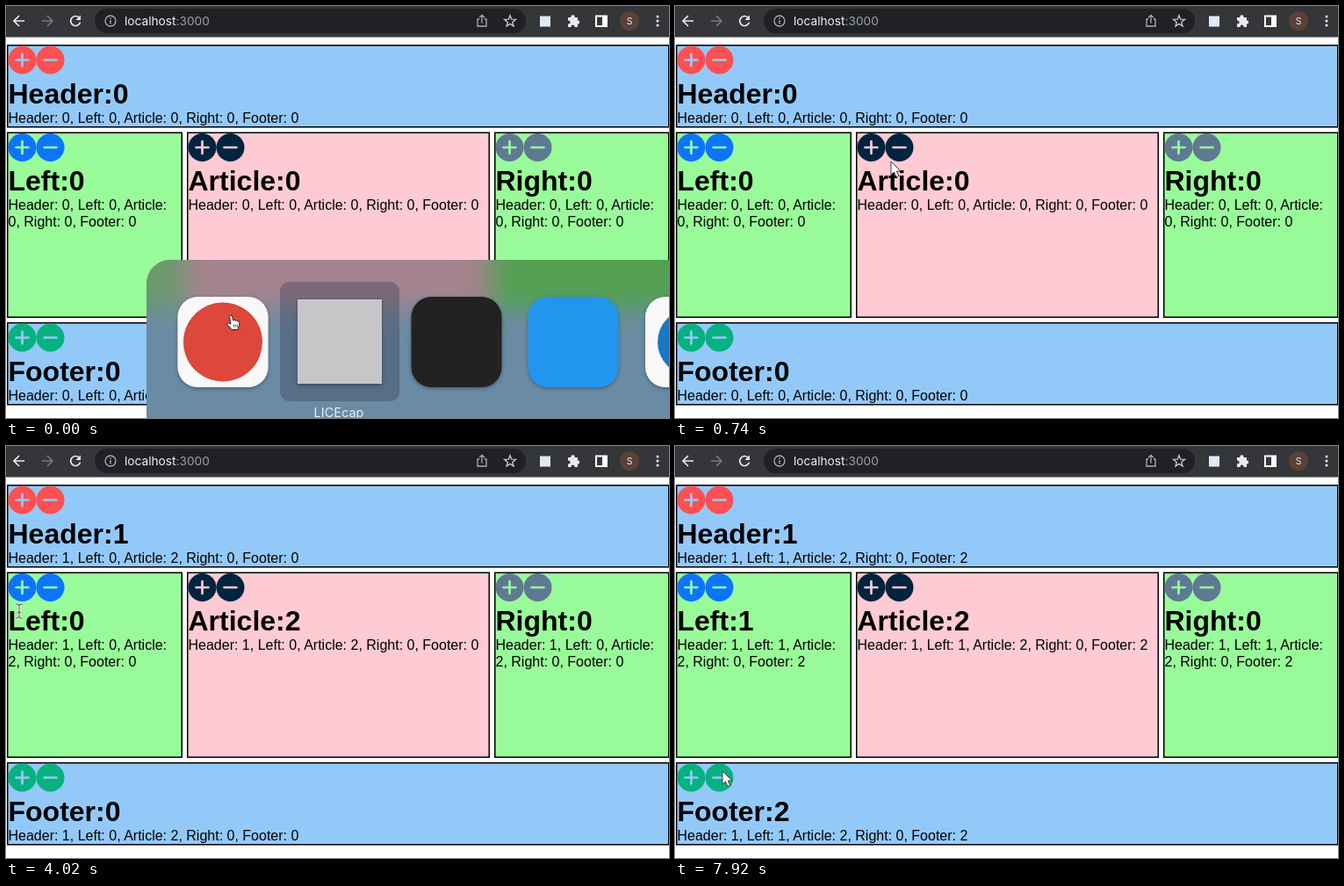
An HTML page that plays this animation: 755 px wide and 469 px high, repeating every 8 s.

```html
<!DOCTYPE html>
<html lang="en">
<head>
<meta charset="utf-8">
<title>Counter layout</title>
<style>
html, body { margin: 0; width: 100%; height: 100%; overflow: hidden; background: #fff; }
svg { display: block; position: absolute; left: 0; top: 0; }
.h1 { font: bold 32px "Liberation Sans", Arial, sans-serif; }
.p { font: 16px "Liberation Sans", Arial, sans-serif; }
.ui { font: 13.7px Inter, sans-serif; }
.label { font: 14.5px Inter, sans-serif; fill: #eceef2; text-anchor: middle; }
</style>
</head>
<body>
<svg id="stage" width="755" height="469" viewBox="0 0 755 469"></svg>
<script>
const LOOP = 8000;
const BLUE = '#93c9f8', GREEN = '#99fa99', PINK = '#fecad3';

const panels = [
  { name: 'Header',  x: 1,   y: 44,  w: 754.5, h: 94.5, bg: BLUE,  btn: '#fc5053' },
  { name: 'Left',    x: 1,   y: 143.5, w: 200, h: 211.5, bg: GREEN, btn: '#0d75fb', wrap: true },
  { name: 'Article', x: 206, y: 143.5, w: 345, h: 211.5, bg: PINK,  btn: '#03233f' },
  { name: 'Right',   x: 556, y: 143.5, w: 199.5, h: 211.5, bg: GREEN, btn: '#5d7a92', wrap: true },
  { name: 'Footer',  x: 1,   y: 360, w: 754.5, h: 94.5, bg: BLUE,  btn: '#07b180' }
];

// time, counter, new value
const clicks = [
  [1340, 'Article', 1], [1640, 'Article', 2], [3430, 'Header', 1],
  [4620, 'Left', 1], [4920, 'Left', 2], [5670, 'Left', 1],
  [7170, 'Footer', 1], [7470, 'Footer', 2]
];

// time, pointer shape, x, y
const moves = [
  [0, 'hand', 256, 352], [150, 'hand', 260, 360], [290, 'hand', 266, 371],
  [440, 'hand', 271, 379], [590, 'arrow', 262, 285], [740, 'arrow', 246, 177],
  [890, 'arrow', 230, 166], [1040, 'arrow', 222, 159], [1930, 'arrow', 223, 158],
  [2230, 'arrow', 222, 157], [2380, 'arrow', 210, 150], [2530, 'arrow', 160, 122],
  [2680, 'beam', 114, 102], [2830, 'beam', 46, 92], [3130, 'arrow', 20, 64],
  [3280, 'arrow', 18, 61], [3730, 'arrow', 18, 78], [3870, 'arrow', 15, 150],
  [4020, 'beam', 15, 188], [4170, 'arrow', 18, 172], [4470, 'arrow', 20, 161],
  [5070, 'arrow', 34, 161], [5220, 'arrow', 49, 161], [5820, 'arrow', 42, 164],
  [5970, 'arrow', 24, 176], [6120, 'beam', 18, 201], [6270, 'arrow', 19, 305],
  [6420, 'arrow', 20, 396], [6570, 'arrow', 17, 378], [6720, 'arrow', 19, 370],
  [7020, 'arrow', 20, 370], [7770, 'arrow', 38, 370], [7920, 'arrow', 54, 370]
];

const SELECT = 150, DISMISS = 590;

const rect = (x, y, w, h, fill, more = '') =>
  `<rect x="${x}" y="${y}" width="${w}" height="${h}" fill="${fill}" ${more}/>`;
const disc = (x, y, r, fill) => `<circle cx="${x}" cy="${y}" r="${r}" fill="${fill}"/>`;
const line = (d, color, w = 1.7) =>
  `<path d="${d}" fill="none" stroke="${color}" stroke-width="${w}"/>`;
const text = (cls, x, y, s, more = '') =>
  `<text class="${cls}" x="${x}" y="${y}" ${more}>${s}</text>`;

function toolbar() {
  const on = '#e8eaed', dim = '#77787b', soft = '#a9adb2';
  const arrow = (x, dir, c) =>
    line(`M${x - 6 * dir} 17H${x + 6 * dir}M${x} 11L${x - 6 * dir} 17L${x} 23`, c);
  return rect(0, 0, 755, 35.5, '#35363a') +
    rect(101, 3, 491, 28, '#202124', 'rx="14"') +
    arrow(15, 1, on) + arrow(47, -1, dim) +
    line('M83.2 13.2A5.5 5.5 0 1 0 84.5 18.5', on) +
    `<path d="M85 10.5V16H79.5Z" fill="${on}"/>` +
    `<circle cx="119" cy="17" r="6" fill="none" stroke="${soft}" stroke-width="1.3"/>` +
    line('M119 16V20.5M119 13.3V14.8', soft, 1.4) +
    text('ui', 135, 22, `localhost<tspan fill="#9aa0a6">:3000</tspan>`, 'fill="#f1f3f4"') +
    line('M539 15H537V23H547V15H545M542 19.5V10.5M539 13.2L542 10.3L545 13.2', soft, 1.3) +
    `<path d="${star(574, 17.5, 6.8)}" fill="none" stroke="#c8cbcf" stroke-width="1.3"/>` +
    rect(608, 11.5, 12, 12, '#dfe9f7') +
    `<path d="M640 13H643.4A2.2 2.2 0 1 1 647.6 13H651V16.2A2.2 2.2 0 1 1 651 20.6V24H647.4A2 2 0 1 0 643.6 24H640V20.4A2 2 0 1 0 640 16.6Z" fill="${on}"/>` +
    `<rect x="672" y="11.5" width="12" height="11.5" fill="none" stroke="#fff" stroke-width="2"/>` +
    rect(679, 11, 5, 12, '#fff') +
    disc(710, 17, 11, '#5b4037') +
    text('ui', 710, 20.8, 'S', 'fill="#eee" text-anchor="middle" style="font-size:10.5px"') +
    [12, 17, 22].map(y => disc(742, y, 1.5, on)).join('');
}

function star(cx, cy, r) {
  let d = '';
  for (let i = 0; i < 10; i++) {
    const a = i * Math.PI / 5 - Math.PI / 2, k = i % 2 ? r * 0.42 : r;
    d += (i ? 'L' : 'M') + (cx + k * Math.cos(a)).toFixed(2) + ' ' + (cy + k * Math.sin(a)).toFixed(2);
  }
  return d + 'Z';
}

function button(x, y, fill, sign, plus) {
  return disc(x, y, 16, fill) +
    `<path d="M${x - 7} ${y}H${x + 7}${plus ? `M${x} ${y - 7}V${y + 7}` : ''}" stroke="${sign}" stroke-width="2.7" stroke-linecap="round"/>`;
}

function panel(p, counts) {
  const tx = p.x + 1.5, by = p.y + 17.5;
  const parts = panels.map(q => `${q.name}: ${counts[q.name]}`);
  let body;
  if (p.wrap) {
    const [a, b] = parts.join(', ').split(/(?<=Article:) /);
    body = text('p', tx, p.y + 88.5, a) + text('p', tx, p.y + 107, b);
  } else {
    body = text('p', tx, p.y + 88.8, parts.join(', '));
  }
  return rect(p.x + .75, p.y + .75, p.w - 1.5, p.h - 1.5, p.bg, 'stroke="#000" stroke-width="1.5"') +
    button(p.x + 17.5, by, p.btn, p.bg, true) +
    button(p.x + 49.5, by, p.btn, p.bg, false) +
    text('h1', tx, p.y + 66.8, `${p.name}:${counts[p.name]}`) + body;
}

function switcher(t) {
  const first = t >= SELECT;
  const cx = first ? 247 : 380;
  const label = first ? 'Tavoro Bronze' : 'LICEcap';
  const tile = (x, fill) => rect(x, 331, 103, 103, fill, 'rx="23" filter="url(#drop)"');
  return `<g clip-path="url(#sheet)">` +
    rect(160, 289, 600, 190, '#7d8d92') +
    `<g filter="url(#soft)">` +
      rect(60, 200, 143, 145, '#6a9a6d') +
      rect(203, 200, 350, 145, '#a5838e') +
      rect(553, 200, 300, 145, '#52a152') +
      rect(60, 345, 800, 220, '#6a8ba4') +
    `</g></g>` +
    rect(cx - 68, 314, 136, 136, 'rgba(50,58,80,.36)', 'rx="11"') +
    tile(195.5, '#f8f8f8') + disc(247, 382.5, 45, '#dd473c') +
    rect(332, 334, 96, 96, '#c6c6c8', 'filter="url(#drop)"') +
    tile(461.5, '#202022') + tile(594.5, '#2196ee') +
    tile(728, '#f8f8f8') + disc(780, 382.5, 38, '#1878c8') +
    text('label', cx - 1, 468, label);
}

const pointers = {
  arrow: `<path d="M0 0V15.2L3.5 12L6 17.6L8.8 16.4L6.4 11H11Z" fill="#fff" stroke="#3c3c40" stroke-width="1" stroke-linejoin="round"/>`,
  beam: ['#fff', '#6d6d6d'].map((c, i) =>
    line('M-3.5 -8Q0 -8 0 -5.5Q0 -8 3.5 -8M0 -5.5V5.5M-3.5 8Q0 8 0 5.5Q0 8 3.5 8M-2 1.5H2', c, i ? 1.3 : 3)).join(''),
  hand: `<path d="M-1.5 1.2Q0 -.8 1.6 1.2L2.8 6Q4.2 4.6 5.4 6.2Q7 5.2 7.8 7Q9.6 6.4 9.8 8.6Q10 12 8.4 14V16.5H.8Q-.5 13.6 -4 10.6Q-4.6 8.6 -2.6 8.8L0 10.2Z" fill="#fff" stroke="#222" stroke-width="1" stroke-linejoin="round"/>` +
    line('M3.2 10.5V13.5M5.2 10.5V13.5M7.2 10.5V13.5', '#222', .8)
};

const defs = `<defs>
  <clipPath id="sheet"><rect x="160" y="289" width="640" height="220" rx="27"/></clipPath>
  <filter id="soft" filterUnits="userSpaceOnUse" x="60" y="200" width="800" height="370" color-interpolation-filters="sRGB"><feGaussianBlur stdDeviation="15"/></filter>
  <filter id="drop" x="-20%" y="-20%" width="140%" height="140%"><feDropShadow dx="0" dy="1.5" stdDeviation="2" flood-opacity=".35"/></filter>
</defs>`;

const stage = document.getElementById('stage');
stage.innerHTML = defs + toolbar() + '<g id="page"></g><g id="sheetLayer"></g><g id="pointer"></g>';

const cache = {};
function put(id, html) {
  if (cache[id] === html) return;
  cache[id] = html;
  document.getElementById(id).innerHTML = html;
}

function draw(t) {
  const counts = { Header: 0, Left: 0, Article: 0, Right: 0, Footer: 0 };
  for (const [at, name, n] of clicks) if (t >= at) counts[name] = n;
  let now = moves[0];
  for (const m of moves) if (t >= m[0]) now = m;
  const [, shape, x, y] = now;
  put('page', panels.map(p => panel(p, counts)).join(''));
  put('sheetLayer', t < DISMISS ? switcher(t) : '');
  put('pointer', `<g transform="translate(${x} ${y})">${pointers[shape]}</g>`);
}

const start = performance.now();
function tick() {
  draw((performance.now() - start) % LOOP);
  requestAnimationFrame(tick);
}
draw(0);
requestAnimationFrame(tick);
</script>
</body>
</html>
```
